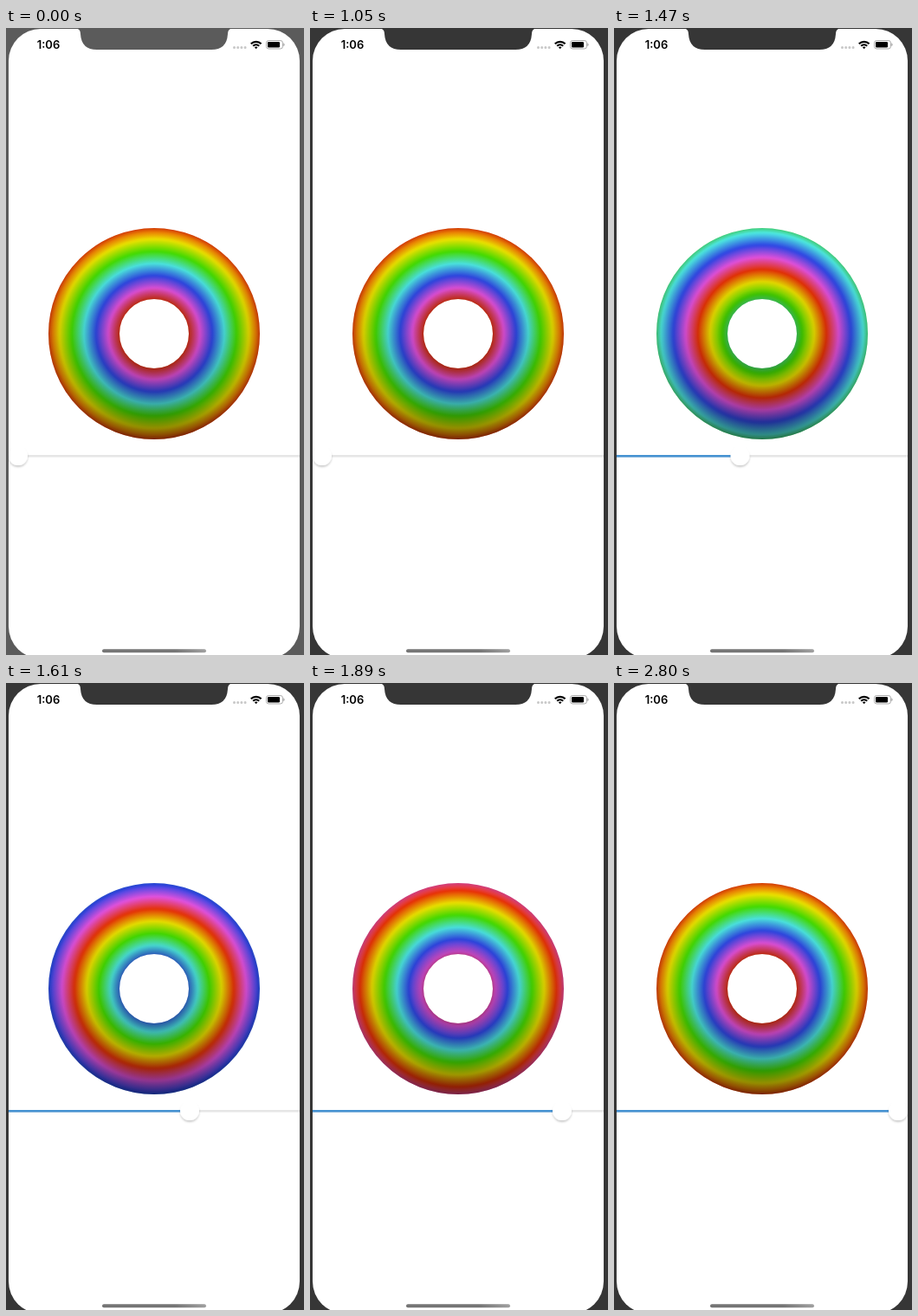
An HTML page for the animation above (3.01 s loop, 344 px wide and 724 px high).

```html
<!DOCTYPE html>
<html lang="en">
<head>
<meta charset="utf-8">
<title>Hue slider</title>
<style>
  html, body { margin: 0; height: 100%; overflow: hidden; background: #363636; }
  svg { display: block; }
  text { font: 600 13px Inter, sans-serif; }
</style>
</head>
<body>
<svg width="344" height="724" viewBox="0 0 344 724">
  <defs>
    <radialGradient id="rainbow" gradientUnits="userSpaceOnUse" cx="171" cy="353" r="122"/>
    <linearGradient id="shade" gradientUnits="userSpaceOnUse" x1="0" y1="231" x2="0" y2="475">
      <stop stop-opacity=".02"/>
      <stop offset=".5" stop-opacity=".12"/>
      <stop offset=".83" stop-opacity=".27"/>
      <stop offset="1" stop-opacity=".44"/>
    </linearGradient>
    <radialGradient id="rim" gradientUnits="userSpaceOnUse" cx="171" cy="353" r="122">
      <stop offset=".328" stop-opacity=".14"/>
      <stop offset=".43" stop-opacity="0"/>
      <stop offset=".96" stop-opacity="0"/>
      <stop offset="1" stop-opacity=".1"/>
    </radialGradient>
    <linearGradient id="bar">
      <stop offset=".7" stop-color="#757575"/>
      <stop offset="1" stop-color="#a0a0a0"/>
    </linearGradient>
    <filter id="shadow" x="-50%" y="-50%" width="200%" height="200%">
      <feDropShadow dx="0" dy="2" stdDeviation="1.3" flood-opacity=".2"/>
    </filter>
    <clipPath id="screen"><rect x="3" y="1" width="336" height="727" rx="37"/></clipPath>
  </defs>

  <rect id="desk" width="344" height="724"/>
  <g clip-path="url(#screen)">
    <rect width="344" height="728" fill="#fff"/>
    <path id="notch" d="M80 0Q86 1 86 7Q87 25 105 25H237Q255 25 256 7Q256 1 262 0Z"/>

    <text x="49" y="24" text-anchor="middle">1:06</text>
    <path d="M263.5 22.5h14" stroke="#c8c8c8" stroke-width="3" stroke-linecap="round" stroke-dasharray="0 4.2"/>
    <g fill="none" stroke="#000" stroke-width="2.2">
      <path d="M282.8 18.2a8.4 8.4 0 0 1 11.8 0M285.2 20.8a5 5 0 0 1 7 0"/>
      <path d="M286.9 22.3a2.6 2.6 0 0 1 3.6 0L288.7 24.2Z" fill="#000" stroke="none"/>
    </g>
    <rect x="300.5" y="14.5" width="19" height="9.5" rx="2.7" fill="none" stroke="#aaa"/>
    <rect x="302" y="16" width="14" height="6.5" rx="1.3"/>
    <path d="M320.7 17.7q1.4 1.5 0 3z" fill="#aaa" stroke="#aaa" stroke-width=".6"/>

    <g fill="none" stroke-width="82">
      <circle cx="171" cy="353" r="81" stroke="url(#rainbow)"/>
      <circle cx="171" cy="353" r="81" stroke="url(#shade)"/>
      <circle cx="171" cy="353" r="81" stroke="url(#rim)"/>
    </g>

    <rect x="3" y="493" width="336" height="2.6" fill="#e6e6e6"/>
    <rect id="filled" x="3" y="493" height="2.6" fill="#4692d2"/>
    <circle id="thumb" cy="494" r="11" fill="#fff" filter="url(#shadow)"/>
    <rect x="111" y="717.3" width="120" height="4" rx="2" fill="url(#bar)"/>
  </g>
</svg>
<script>
const LOOP = 3010, TICK = 70, STOPS = 48;
const MIN_X = 14, MAX_X = 328, HOLE = 40 / 122;
const PALETTE = [[238, 52, 6], [242, 232, 0], [70, 228, 0], [78, 236, 232], [48, 72, 236], [234, 84, 228]];
// Thumb position and speed at regular moments of the drag.
const DRAG_START = 1050, DRAG_STEP = 280;
const DRAG = [[14, 0], [81, 100], [212, 108], [291, 58], [328, 0]];

const byId = id => document.getElementById(id);
const rainbow = byId('rainbow');
const stops = Array.from({ length: STOPS + 1 }, (_, i) => {
  const stop = document.createElementNS('http://www.w3.org/2000/svg', 'stop');
  stop.setAttribute('offset', HOLE + (1 - HOLE) * i / STOPS);
  return rainbow.appendChild(stop);
});

function hueColor(turn) {
  const h = (turn - Math.floor(turn)) * 6, i = Math.floor(h) % 6;
  const next = PALETTE[(i + 1) % 6];
  return `rgb(${PALETTE[i].map((c, k) => Math.round(c + (next[k] - c) * (h % 1)))})`;
}

function thumbX(t) {
  const p = Math.min(Math.max((t - DRAG_START) / DRAG_STEP, 0), DRAG.length - 1);
  const i = Math.min(Math.floor(p), DRAG.length - 2), u = p - i;
  const [a, va] = DRAG[i], [b, vb] = DRAG[i + 1];
  const ease = u * u * (3 - 2 * u);
  return a + (b - a) * ease + va * u * (1 - u) ** 2 - vb * u * u * (1 - u);
}

function draw(now) {
  const t = Math.floor(now % LOOP / TICK) * TICK;
  const x = thumbX(t), value = (x - MIN_X) / (MAX_X - MIN_X);
  const frameColor = t < 840 ? '#5b5b5b' : '#363636';
  byId('desk').setAttribute('fill', frameColor);
  byId('notch').setAttribute('fill', frameColor);
  byId('thumb').setAttribute('cx', x);
  byId('filled').setAttribute('width', x - 3);
  stops.forEach((stop, i) =>
    stop.setAttribute('stop-color', hueColor(value + 0.015 + 0.97 * (1 - i / STOPS))));
  requestAnimationFrame(draw);
}
const start = performance.now();
requestAnimationFrame(function first() { draw(0); });
const drawAt = draw;
draw = now => drawAt(Math.max(0, now - start));
</script>
</body>
</html>
```
